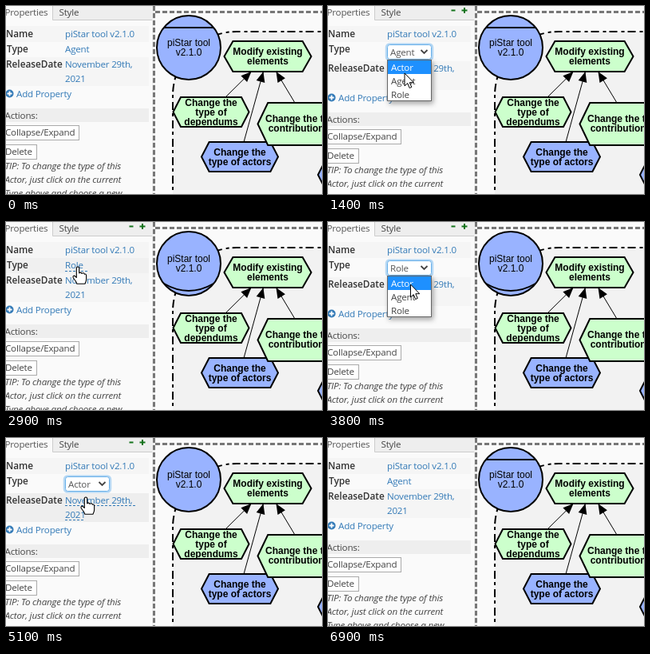
Write an HTML page that moves like this. It is 396 px wide and 235 px high and loops after 7100 ms.

```html
<!DOCTYPE html>
<html lang="en">
<head>
<meta charset="utf-8">
<title>Actor type editing</title>
<style>
html, body { margin: 0; width: 100%; height: 100%; overflow: hidden; background: #fff; }
svg { display: block; width: 396px; height: 235px; }
.ui { font: 11.6px "Open Sans", sans-serif; letter-spacing: -.2px; fill: #444; }
.key { font-size: 11.8px; font-weight: 600; fill: #333; letter-spacing: 0; }
.link { fill: #337ab7; }
.tip { font-style: italic; letter-spacing: -.17px; }
.dia { font: bold 12px "Liberation Sans", Arial, sans-serif; text-anchor: middle; fill: #000; }
.plain { font-weight: normal; }
.ink { stroke: #000; stroke-width: 2; }
.under { stroke: #337ab7; stroke-dasharray: 3 2; }
.edge { fill: none; stroke: #777; stroke-width: 3; stroke-dasharray: 6 3; }
#menu { filter: drop-shadow(2px 3px 3px rgba(0, 0, 0, .35)); }
</style>
</head>
<body>
<svg viewBox="0 0 396 235">
  <rect width="396" height="235" fill="#fafafa"/>
  <path class="edge" d="M187 7.500H396"/>
  <g id="diagram"></g>
  <g id="panel" class="ui">
    <rect width="184" height="235" fill="#fafafa"/>
    <rect x="58" width="126" height="17" fill="#eee"/>
    <path d="M58.500 0V17.500H183" fill="none" stroke="#ccc"/>
    <text x="-1.500" y="11.500" fill="#555">Properties</text>
    <text x="66.500" y="11.500">Style</text>
    <g id="zoom" stroke="#14741c" stroke-width="2"><path d="M154.500 5.500h5M167.500 5.500h7M171 2v7"/></g>
    <rect y="25" width="179" height="20" fill="#f5f5f5"/>
    <rect id="typeRow" y="45" width="179" height="19" fill="#fafafa"/>
    <text class="key" x="0" y="39">Name</text>
    <text class="link" x="74" y="39">piStar tool v2.1.0</text>
    <text class="key" x="1" y="58">Type</text>
    <text id="typeText" class="link" x="74" y="58"></text>
    <path id="typeLine" class="under" d="M74 61.500h30"/>
    <g id="lower">
      <rect id="dateRow" y="64" width="179" height="36"/>
      <text class="key" x="0" y="77">ReleaseDate</text>
      <text class="link" x="74" y="77">November 29th,</text>
      <text class="link" x="74" y="95">2021</text>
      <path id="dateLine" class="under" d="M74 79.500h88M74 97.500h25"/>
      <circle cx="4.500" cy="109.500" r="5" fill="#337ab7"/>
      <path d="M1.500 109.500h6M4.500 106.500v6" stroke="#fff" stroke-width="1.800"/>
      <text class="link" x="13" y="114">Add Property</text>
      <rect y="128" width="179" height="17" fill="#eee"/>
      <text x="-1.500" y="141">Actions:</text>
      <g fill="#fff" stroke="#aaa">
        <rect x="-4.500" y="149.500" width="96" height="18"/>
        <rect x="-4.500" y="173.500" width="43" height="18"/>
      </g>
      <text x="-1" y="162">Collapse/Expand</text>
      <text x="-1" y="186">Delete</text>
      <g class="tip">
        <text x="-1.500" y="204">TIP: To change the type of this</text>
        <text x="-1.500" y="221">Actor, just click on the current</text>
        <text x="-1.500" y="238">Type above and choose a new</text>
      </g>
    </g>
    <g id="select">
      <rect id="glow" x="73" y="47.500" width="58" height="20" rx="4" fill="none" stroke="#8cc3f0" stroke-width="2.500" opacity=".6"/>
      <rect id="box" x="74.500" y="48.500" width="55" height="18" rx="3" fill="#fff"/>
      <text id="choice" x="78" y="62" fill="#555"></text>
      <path d="M116.500 55l4 4 4-4" fill="none" stroke="#444" stroke-width="1.800"/>
    </g>
    <g id="menu">
      <rect x="74.500" y="67.500" width="55" height="51" fill="#fff" stroke="#666"/>
      <rect id="mark" x="75" width="54" height="17" fill="#1e90ff"/>
    </g>
  </g>
  <rect x="183" width="4" height="235" fill="#eee"/>
  <path class="edge" d="M185.500 0V235"/>
  <g id="cursor" stroke="#000" fill="#fff" stroke-linejoin="round">
    <path id="arrow" d="M0 0V16L3.700 12.600 6.200 18.500 8.800 17.400 6.300 11.700H11.300Z"/>
    <path id="hand" transform="scale(1.12)" d="M-1.500 1Q0 -1 1.500 1V7Q3.500 5.500 4.500 7.500Q6.500 6 7.500 8.200Q9.500 7.500 9.500 10V14Q9.500 16 8 19H-1Q-2 16 -5 12.500Q-6 10 -4 9.800L-1.500 12Z"/>
  </g>
</svg>
<script>
const LOOP = 7100, STEP = 100;
const NS = "http://www.w3.org/2000/svg";
const $ = id => document.getElementById(id);

function add(parent, tag, attrs, text) {
  const el = document.createElementNS(NS, tag);
  for (const k in attrs) el.setAttribute(k, attrs[k]);
  if (text) el.textContent = text;
  parent.append(el);
  return el;
}

const dia = $("diagram"), GREEN = "#ccffcc", BLUE = "#99b3ff";

function label(cx, y, lines, cls = "dia") {
  lines.forEach((s, i) => add(dia, "text", { x: cx, y: y + i * 12, class: cls }, s));
}

function hexagon(x, y, w, h, fill, textY, lines) {
  const m = y + h / 2, r = x + w, inset = w * .1;
  add(dia, "path", {
    d: `M${x} ${m}L${x + inset} ${y}H${r - inset}L${r} ${m}L${r - inset} ${y + h}H${x + inset}Z`,
    fill, class: "ink"
  });
  label(x + w / 2, textY, lines);
}

function arrow(x1, y1, x2, y2) {
  const deg = Math.atan2(y2 - y1, x2 - x1) * 180 / Math.PI;
  add(dia, "path", { d: `M${x1} ${y1}L${x2} ${y2}`, stroke: "#000" });
  add(dia, "path", { d: "M0 0L-13 -5.5V5.5Z", transform: `translate(${x2} ${y2}) rotate(${deg})` });
}

add(dia, "path", {
  d: "M209 245V112A80 80 0 0 1 289 32H410V245Z", fill: "#f2f2f2", class: "ink",
  "stroke-dasharray": "10 5 4 4"
});
add(dia, "circle", { cx: 229, cy: 52, r: 40, fill: BLUE, class: "ink" });
const decor = add(dia, "path", { fill: "none", class: "ink" });
label(229, 50, ["piStar tool", "v2.1.0"], "dia plain");
arrow(275, 114, 307.5, 82);
arrow(298, 170, 322.5, 82);
arrow(362, 121, 338.5, 82);
hexagon(273.5, 44, 109, 38, GREEN, 61, ["Modify existing", "elements"]);
hexagon(209.5, 114, 95, 37, GREEN, 125, ["Change the", "type of", "dependums"]);
hexagon(245, 170, 96, 37, BLUE, 187, ["Change the", "type of actors"]);
hexagon(315.5, 121, 127, 53, GREEN, 145, ["Change the type of", "contribution links"]);
hexagon(391, 192, 96, 38, BLUE, 209, []);

const TYPES = ["Actor", "Agent", "Role"];
const DECOR = { Actor: "", Agent: "M198 27H260", Role: "M198 77Q229 95 260 77" };
const items = TYPES.map((s, i) => add($("menu"), "text", { x: 79, y: 81 + i * 17 }, s));

// Each edit: select shown, menu opened, menu closed, new type applied
const EDITS = [
  { open: 700, drop: 1200, pick: 2100, done: 2200, from: "Agent", to: "Role" },
  { open: 3100, drop: 3500, pick: 4000, done: 4100, from: "Role", to: "Actor" },
  { open: 4800, drop: 5500, pick: 6300, done: 6400, from: "Actor", to: "Agent" }
];

// Pointer stops: time, x, y
const PATH = [
  [100, 385, 215], [500, 90, 60], [1200, 90, 60], [1600, 102, 108],
  [2300, 102, 108], [2900, 90, 56], [3000, 90, 56], [3100, 90, 60],
  [3500, 90, 60], [3800, 103.5, 78], [4100, 103.5, 78], [4500, 90, 56],
  [4700, 90, 56], [4900, 90, 60], [5100, 100, 74], [5300, 90, 60],
  [5500, 90, 60], [6100, 102, 88], [6400, 102, 88], [6900, 405, 240]
];

function pointer(t) {
  let i = 0;
  while (i < PATH.length - 2 && t >= PATH[i + 1][0]) i++;
  const [t0, x0, y0] = PATH[i], [t1, x1, y1] = PATH[i + 1];
  const u = Math.min(1, Math.max(0, (t - t0) / (t1 - t0)));
  const e = u * u * (3 - 2 * u);
  return [x0 + (x1 - x0) * e, y0 + (y1 - y0) * e];
}

const show = (id, on) => $(id).setAttribute("display", on ? "inline" : "none");
const fill = (id, c) => $(id).setAttribute("fill", c);

function draw(time) {
  const t = Math.floor((time % LOOP) / STEP) * STEP;
  const edit = EDITS.find(e => t >= e.open && t < e.done);
  const past = EDITS.filter(e => t >= e.done).pop();
  const type = past ? past.to : "Agent";
  const dropped = !!edit && t >= edit.drop && t < edit.pick;
  const [x, y] = pointer(t);
  const visible = t >= 100 && t < 6900;
  const inside = visible && x < 184;
  const onType = inside && !edit && y > 46 && y < 65 && x < 112;
  const onDate = inside && t < 6300 && !dropped && y >= (edit ? 70 : 65) && y < 98 && x < 160;

  decor.setAttribute("d", DECOR[type]);
  show("zoom", inside);
  $("typeText").textContent = type;
  show("typeText", !edit);
  show("typeLine", onType);
  show("dateLine", onDate);
  $("typeRow").setAttribute("height", edit ? 24 : 19);
  fill("typeRow", inside && y > 46 && y < 65 ? "#f0f0f0" : "#fafafa");
  fill("dateRow", onDate ? "#eee" : "#f5f5f5");
  $("lower").setAttribute("transform", `translate(0 ${edit ? 5 : 0})`);

  show("select", edit);
  show("menu", dropped);
  if (edit) {
    const focus = t >= edit.open + 200;
    $("choice").textContent = edit.from;
    fill("choice", t === edit.open ? "#888" : "#555");
    show("glow", focus);
    $("box").setAttribute("stroke", focus ? "#66afe9" : "#bbb");
  }
  if (dropped) {
    const row = y >= 68 ? Math.min(2, Math.floor((y - 68) / 17)) : TYPES.indexOf(edit.from);
    $("mark").setAttribute("y", 68 + row * 17);
    items.forEach((el, i) => el.setAttribute("fill", i === row ? "#fff" : "#444"));
  }

  const link = onType || onDate;
  show("cursor", visible);
  show("arrow", !link);
  show("hand", link);
  $("cursor").setAttribute("transform", `translate(${x.toFixed(1)} ${y.toFixed(1)})`);
}

const start = performance.now();
function tick() {
  draw(performance.now() - start);
  requestAnimationFrame(tick);
}
tick();
</script>
</body>
</html>
```
